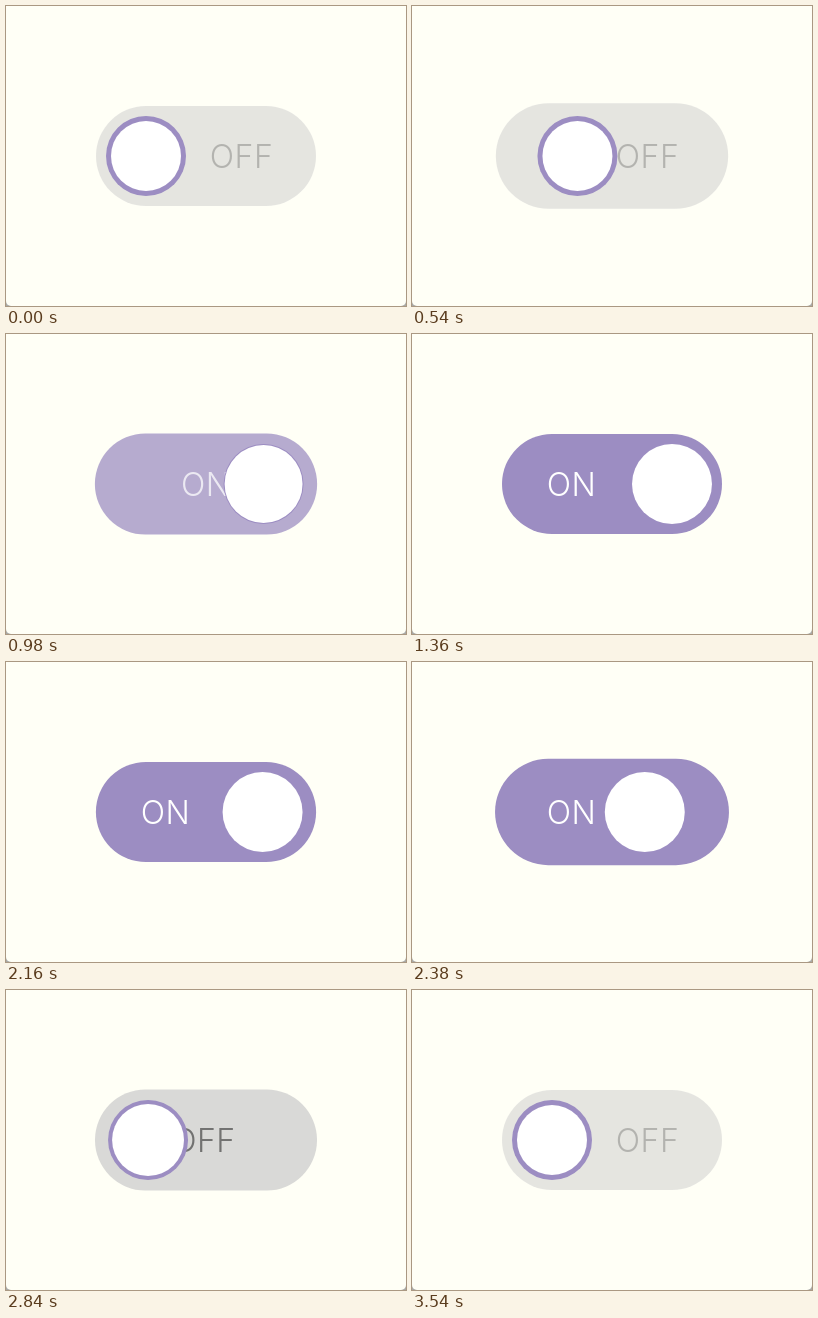
These frames come from a looping animation (400x300 px, 4.2 s). An HTML page:

```html
<!DOCTYPE html>
<html lang="en">
<head>
<meta charset="utf-8">
<title>Toggle switch</title>
<style>
  html, body { margin: 0; width: 100%; height: 100%; overflow: hidden; background: #a9a9a6; }
  svg { display: block; width: 400px; height: 300px; background: #fffff6; border-radius: 0 0 5px 5px; }
  text { font: 300 32px Inter, "Liberation Sans", sans-serif; letter-spacing: .5px; text-anchor: middle; }
</style>
</head>
<body>
<svg viewBox="0 0 400 300">
  <rect id="pill"/>
  <text id="label" y="161.5"></text>
  <circle id="ring" cy="150" r="40" fill="#9c8dc2"/>
  <circle id="knob" cy="150" fill="#fff"/>
</svg>
<script>
const LOOP = 4200;
const OFF = { knob: 140, label: 235.5, alpha: .5, ring: 5, word: 'OFF', fill: '#ccc', ink: '#222' };
const ON = { knob: 260, label: 159.5, alpha: 1, ring: 0, word: 'ON', fill: '#9c8dc2', ink: '#fff' };
const toggles = [
  { press: 315, release: 822, from: OFF, to: ON },
  { press: 2135, release: 2675, from: ON, to: OFF }
];

const [pill, label, ring, knob] = ['pill', 'label', 'ring', 'knob'].map(id => document.getElementById(id));
const clamp = x => Math.max(0, Math.min(1, x));
const mix = (a, b, p) => a + (b - a) * p;
const sineInOut = x => (1 - Math.cos(Math.PI * clamp(x))) / 2;
const quadOut = x => 1 - (1 - clamp(x)) ** 2;
const settle = (t, tau) => 1 - Math.exp(-t / tau);
const set = (el, attrs) => { for (const k in attrs) el.setAttribute(k, attrs[k]); };

// While pressed the knob creeps across and the pill swells.
const creep = t => 47 / 120 * quadOut(t / 700);
const swell = t => sineInOut(t / 420);

function pose(time) {
  const toggle = toggles.filter(g => time >= g.press).pop();
  if (!toggle) return { ...OFF, grow: 0 };
  const { press, release, from, to } = toggle;
  if (time < release) {
    const held = time - press;
    return { ...from, knob: mix(from.knob, to.knob, creep(held)), grow: swell(held) };
  }
  const t = time - release;
  const fade = sineInOut(t / 330);
  const start = mix(from.knob, to.knob, creep(release - press));
  return {
    ...to,
    knob: mix(start, to.knob, settle(t, 46)),
    label: mix(from.label, to.label, fade),
    alpha: mix(from.alpha, to.alpha, fade),
    ring: mix(from.ring, to.ring, settle(t, 100)),
    grow: 1 - settle(t, 70)
  };
}

function draw(time) {
  const s = pose(time);
  const scale = 1 + .1 * s.grow;
  const w = 220 * scale, h = 100 * scale;
  set(pill, { x: 200 - w / 2, y: 150 - h / 2, width: w, height: h, rx: h / 2, fill: s.fill, opacity: s.alpha });
  // The label fades within the pill, so it takes the pill's opacity twice.
  const labelAlpha = s.word === 'OFF' ? s.alpha ** 2 : s.alpha;
  set(label, { x: s.label, fill: s.ink, opacity: labelAlpha });
  label.textContent = s.word;
  set(ring, { cx: s.knob });
  set(knob, { cx: s.knob, r: 40 - s.ring });
}

const begin = performance.now();
function frame() {
  draw((performance.now() - begin) % LOOP);
  requestAnimationFrame(frame);
}
frame();
</script>
</body>
</html>
```
